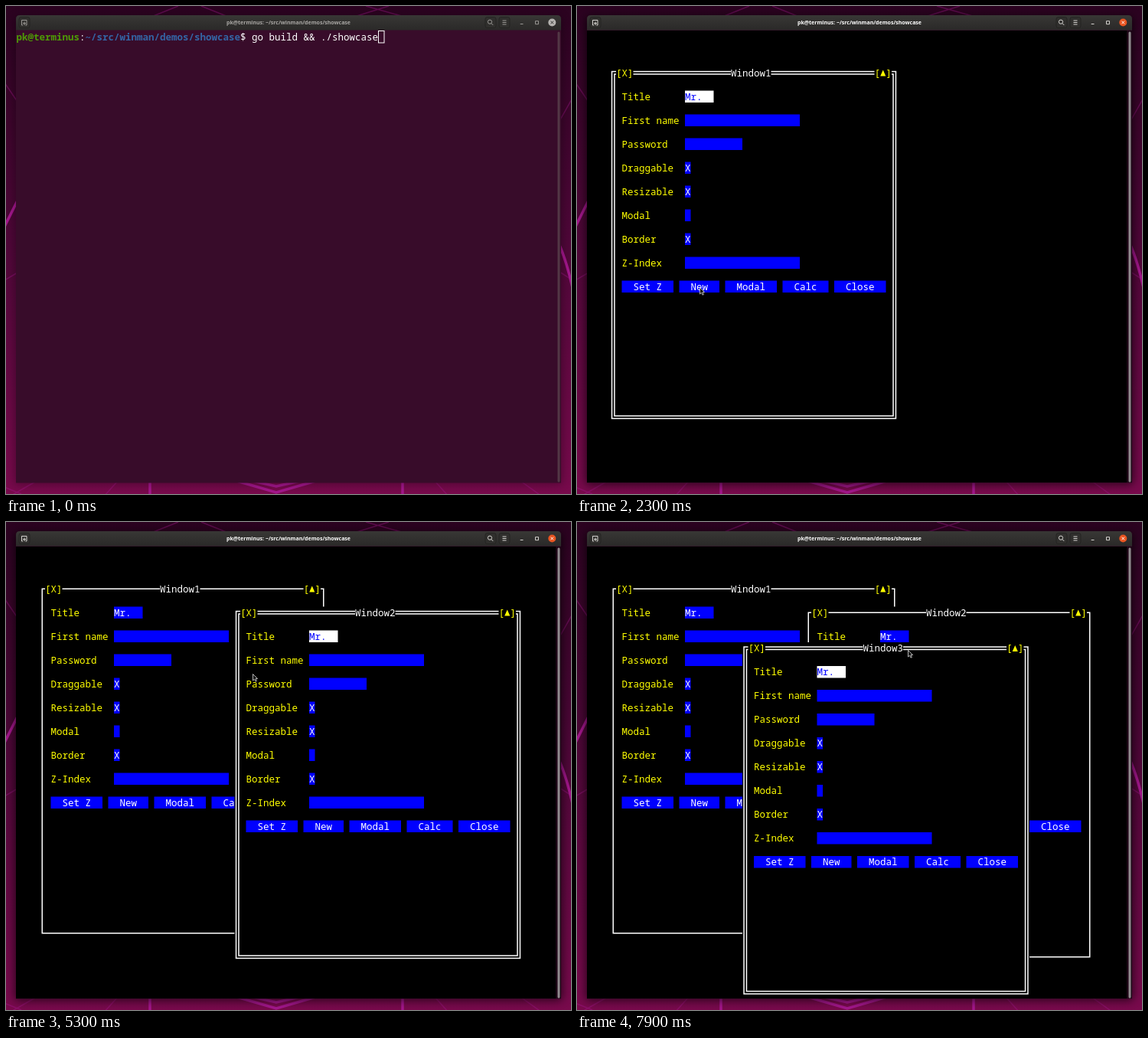
These frames come from a looping animation (738x637 px, 8 s). An HTML page:

```html
<!DOCTYPE html>
<html lang="en">
<head>
<meta charset="utf-8">
<style>
  html, body { margin: 0; width: 100%; height: 100%; overflow: hidden; background: #2a0420; }
  svg { display: block; width: 738px; height: 637px; }
  text { white-space: pre; }
  .cells { font: 12.5px "Noto Sans Mono", "DejaVu Sans Mono", monospace; }
  .caption { font: bold 7px "Noto Sans", "Open Sans", sans-serif; text-anchor: middle; }
</style>
</head>
<body>
<svg viewBox="0 0 738 637" xmlns="http://www.w3.org/2000/svg">
  <defs>
    <linearGradient id="sky" x2="0" y2="1">
      <stop offset="0" stop-color="#2b0320"/>
      <stop offset=".5" stop-color="#500739"/>
      <stop offset="1" stop-color="#780a4c"/>
    </linearGradient>
    <linearGradient id="bar" x2="0" y2="1">
      <stop offset="0" stop-color="#383735"/>
      <stop offset="1" stop-color="#2a2928"/>
    </linearGradient>
    <filter id="blur" x="-10%" y="-10%" width="120%" height="120%"><feGaussianBlur stdDeviation="6"/></filter>
  </defs>

  <rect width="738" height="637" fill="url(#sky)"/>
  <g fill="none" stroke="#a3178c" stroke-width="3.5">
    <path d="M-2 288L15 254M723 312Q733 336 740 368"/>
    <path d="M188 620V640M518 620V640M298 619L353 635L408 619M318 619L353 627L388 619"/>
    <path stroke-width="1.5" stroke-opacity=".4" d="M-2 358L15 348M723 347L740 358M-2 100L15 125M723 150L740 120M-2 628L20 637M40 620L5 640M146 620L128 640M560 620L578 640M672 620L700 640M225 0L190 14M255 0L290 14M500 0L455 14M470 0L520 14"/>
  </g>
  <rect id="shadow" x="11" y="13" width="716" height="612" rx="6" fill="#000" filter="url(#blur)"/>

  <path d="M13 32V17q0-5 5-5H720q5 0 5 5V32Z" fill="url(#bar)"/>
  <g fill="#302f2d" stroke="#222120" stroke-width=".8">
    <rect x="17" y="14.5" width="14" height="14" rx="2.5"/>
    <rect x="626" y="14.5" width="14" height="14" rx="2.5"/>
    <rect x="644" y="14.5" width="14" height="14" rx="2.5"/>
  </g>
  <g id="icons" fill="none" stroke-width=".9">
    <path d="M20.5 25V18.5H27V25H25.5M20.5 25H22M24 20.5V25M22 22.7H26"/>
    <circle cx="632" cy="20.7" r="2.6"/><path d="M634 22.7L636.3 25"/>
    <path d="M648.5 19H653.5M648.5 21.5H653.5M648.5 24H653.5M671.7 23.5H675.5M691.5 19.7H695.5V23.7H691.5Z"/>
  </g>
  <circle id="close" cx="713.3" cy="21.5" r="5"/>
  <path id="cross" d="M711.5 19.7L715.1 23.3M715.1 19.7L711.5 23.3"/>
  <text id="caption" class="caption" x="369" y="24.2">pk@terminus: ~/src/winman/demos/showcase</text>

  <rect x="13" y="31.5" width="712" height="591" fill="#380c2a"/>
  <g id="screen" class="cells"></g>
  <rect id="scroll" x="720.5" y="33.5" width="3" height="588" rx="1.5"/>
  <path id="pointer" d="M.5 .5V9L2.5 7.2L4 10.2L5.4 9.5L4 6.6H6.6Z" fill="#111" stroke="#ddd" stroke-width=".8"/>
</svg>

<script>
const LOOP = 8000, STEP = 100;
const CW = 7.5, CH = 15.5, X0 = 13.5, Y0 = 33;
const COLS = 50, ROWS = 30;
const YELLOW = '#ff0', BLUE = '#00f', WHITE = '#fff';
const $ = id => document.getElementById(id);
const px = col => X0 + col * CW;
const py = row => Y0 + row * CH;

// time, x, y
const PATH = [
  [100, 355, 640], [500, 355, 437], [900, 355, 437], [1700, 352, 406],
  [2200, 156, 366], [2300, 160, 367], [2600, 160, 367], [2700, 162, 367],
  [3000, 162, 367], [3200, 262, 130], [3300, 268, 98], [3500, 278, 103],
  [3900, 354, 104], [4000, 446, 109], [4200, 518, 112], [4300, 520, 118],
  [4500, 520, 118], [4800, 400, 215], [5300, 322, 198], [5700, 424, 404],
  [6000, 423, 394], [6100, 423, 394], [6500, 266, 122], [6700, 278, 119],
  [7000, 285, 119], [7900, 432, 167]
];
const FIELDS = [['Title', 5, 'Mr.'], ['First name', 20, ''], ['Password', 10, ''], ['Draggable', 1, 'X'],
  ['Resizable', 1, 'X'], ['Modal', 1, ''], ['Border', 1, 'X'], ['Z-Index', 20, '']];
const BUTTONS = ['Set Z', 'New', 'Modal', 'Calc', 'Close'];

function pointerAt(t) {
  const next = PATH.findIndex(key => key[0] > t);
  if (next === 0) return PATH[0].slice(1);
  if (next < 0) return PATH[PATH.length - 1].slice(1);
  const a = PATH[next - 1], b = PATH[next];
  const k = (t - a[0]) / (b[0] - a[0]);
  return [1, 2].map(i => a[i] + (b[i] - a[i]) * k);
}

// The window keeps the grabbed title cell under the pointer.
function dragged(t, start, end, grip) {
  const [x, y] = pointerAt(Math.min(Math.max(t, start), end));
  return [Math.floor((x - X0) / CW) - grip, Math.floor((y - Y0) / CH)];
}

const fill = (col, row, cols, rows, color) =>
  `<rect x="${px(col)}" y="${py(row)}" width="${cols * CW}" height="${rows * CH}" fill="${color}"/>`;
const print = (col, row, str, color, weight = 400) =>
  `<text x="${px(col)}" y="${py(row) + 12.1}" fill="${color}" font-weight="${weight}">${str.replace(/&/g, '&amp;')}</text>`;

function frame(col, row, active) {
  const box = inset => {
    const x = px(col + .5) + inset, y = py(row + .5) + inset;
    return `<rect x="${x}" y="${y}" width="${(COLS - 1) * CW - 2 * inset}" height="${(ROWS - 1) * CH - 2 * inset}"/>`;
  };
  return `<g fill="none" stroke="${WHITE}" stroke-width="1.5">${active ? box(-1.7) + box(1.7) : box(0)}</g>`;
}

function win(col, row, title, active) {
  let s = fill(col, row, COLS, ROWS, '#000') + frame(col, row, active);
  const label = (c, str, color) => fill(col + c, row, str.length, 1, '#000') + print(col + c, row, str, color);
  s += label(1, '[X]', YELLOW) + label(21, title, WHITE) + label(46, '[ ]', YELLOW);
  const x = px(col + 47), y = py(row);
  s += `<path d="M${x + .2} ${y + 12}h7.1L${x + 3.75} ${y + 4}Z" fill="${YELLOW}"/>`;
  FIELDS.forEach(([name, width, value], i) => {
    const r = row + 2 + 2 * i, lit = active && i === 0;
    s += print(col + 2, r, name, YELLOW) + fill(col + 13, r, width, 1, lit ? WHITE : BLUE)
      + print(col + 13, r, value, lit ? BLUE : WHITE);
  });
  let c = col + 2;
  for (const name of BUTTONS) {
    s += fill(c, row + 18, name.length + 4, 1, BLUE) + print(c + 2, row + 18, name, WHITE);
    c += name.length + 5;
  }
  return s;
}

function shell(t) {
  const caret = t < 900 ? [63, 0] : [0, 1];
  const hollow = t < 200;
  return print(0, 0, 'pk@terminus', '#4e9a06', 700) + print(11, 0, ':', WHITE)
    + print(12, 0, '~/src/winman/demos/showcase', '#3465a4', 700)
    + print(39, 0, '$ go build && ./showcase', WHITE)
    + `<rect x="${px(caret[0]) + .5}" y="${py(caret[1]) - .5}" width="7.5" height="15.5" stroke="#fff" fill="${hollow ? 'none' : WHITE}"/>`;
}

function desktop(t) {
  const places = [[4, 3]];
  if (t >= 2900) places.push(dragged(t, 3500, 4500, 29));
  if (t >= 5800) places.push(dragged(t, 7000, 7900, 28));
  return '<rect x="13" y="32" width="705.5" height="590" fill="#000"/>'
    + '<rect x="718.5" y="32" width="6.5" height="590" fill="#1d0616"/>'
    + places.map(([c, r], i) => win(c, r, 'Window' + (i + 1), i === places.length - 1)).join('');
}

function draw(t) {
  const focus = Math.min(Math.max((t - 100) / 300, 0), 1), on = t >= 200;
  $('shadow').setAttribute('opacity', .3 + .3 * focus);
  $('icons').setAttribute('stroke', on ? '#e8e6e3' : '#a5a3a0');
  $('caption').setAttribute('fill', on ? WHITE : '#a9a7a4');
  $('close').setAttribute('fill', on ? '#e95420' : '#b5b3b0');
  $('cross').setAttribute('stroke', on ? WHITE : '#333');
  $('scroll').setAttribute('fill', t >= 1300 ? '#918b8f' : '#533846');
  $('screen').innerHTML = t < 1300 ? shell(t) : desktop(t);
  const shown = t >= 100 && t < 900 || t >= 1700;
  $('pointer').setAttribute('visibility', shown ? 'visible' : 'hidden');
  $('pointer').setAttribute('transform', `translate(${pointerAt(t)})`);
}

const begun = performance.now();
let last = -1;
function tick() {
  const t = Math.floor(((performance.now() - begun) % LOOP) / STEP) * STEP;
  if (t !== last) draw(last = t);
  requestAnimationFrame(tick);
}
tick();
</script>
</body>
</html>
```
